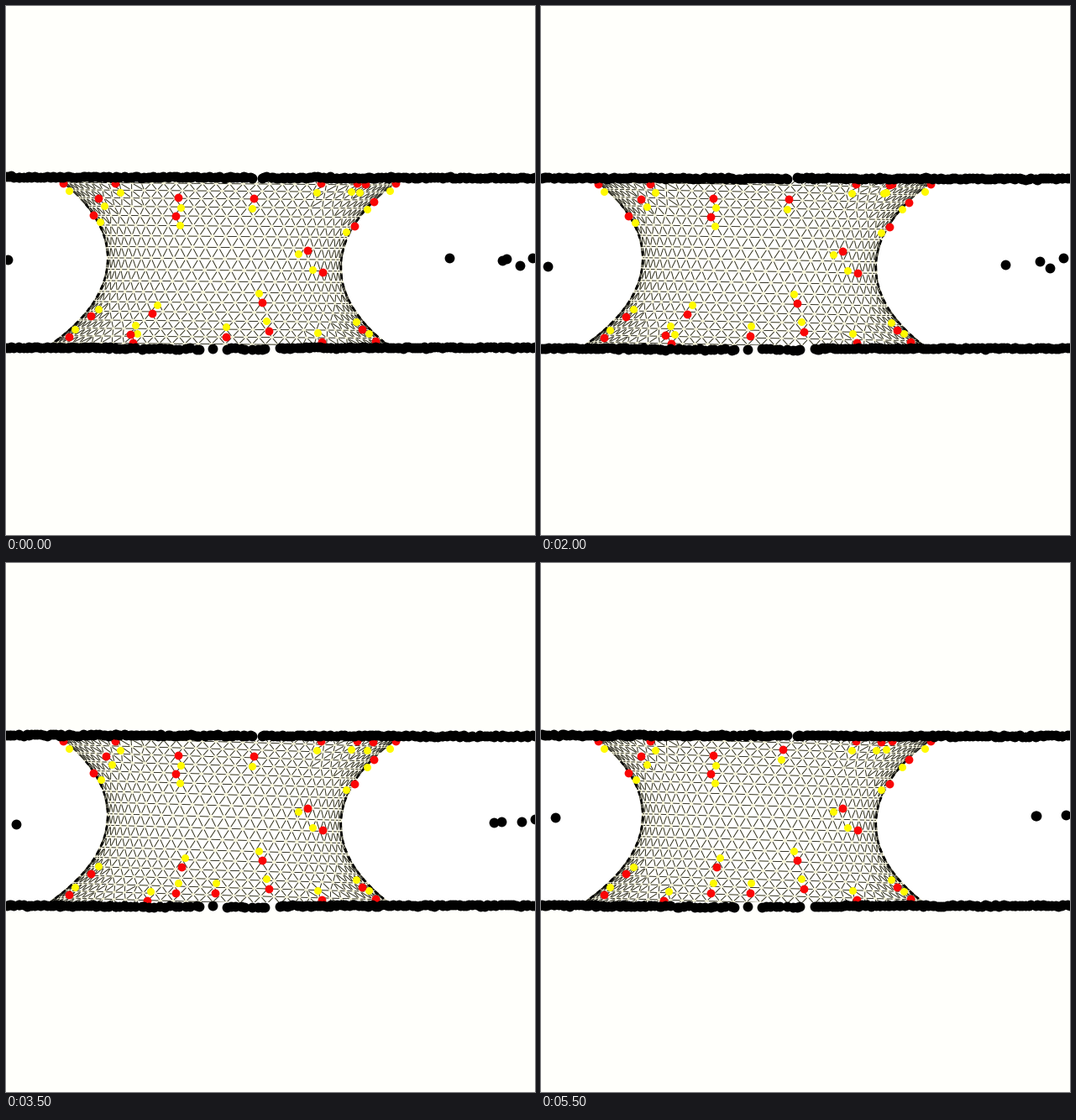
These frames come from a looping animation (630x630 px, 6 s). A matplotlib script:

```python
import numpy as np
import matplotlib.pyplot as plt
from matplotlib.animation import FuncAnimation
from matplotlib.collections import LineCollection
from matplotlib.patches import Rectangle
from matplotlib.tri import Triangulation

SIZE, DPI, FRAMES = 630, 100, 12
PX = 72 / DPI
WAIST_X, WAIST_Y, WAIST_R, FLARE, LEAN = 260, 306, 140, 0.0093, -0.065

# Defects inside the mesh; hops are (frame, start, end)
RESTING = [(205, 228), (202, 250), (359, 291), (377, 317), (313, 387),
           (305, 353), (376, 400), (130, 211), (375, 211), (418, 211)]
HOPS = [(4, (110, 229), (119, 229)), (7, (174, 366), (209, 361)),
        (2, (262, 394), (249, 392)), (8, (295, 229), (288, 221)),
        (5, (148, 391), (202, 392))]
# Heights of the defects along each silhouette
RIM_LEFT, RIM_RIGHT = [211, 249, 369, 394], [211, 233, 262, 385, 399]


def radius(y):
    return WAIST_R * np.cosh(FLARE * (y - WAIST_Y))


def centre(y):
    return WAIST_X + LEAN * (y - WAIST_Y)


def ease(t):
    t = np.clip(t, 0, 1)
    return t * t * (3 - 2 * t)


def drop(frame):
    return 1.6 * (1 - np.exp(-frame / 3))


def build_mesh(spacing=16):
    """Evenly spaced rows on the neck, triangulated in conformal coordinates."""
    y = np.linspace(196, 418, 2000)
    r = radius(y)
    arc = np.concatenate([[0], np.cumsum(np.hypot(np.diff(y), np.diff(r)))])
    conformal = np.concatenate([[0], np.cumsum(np.diff(arc) / r[1:])])
    rows = np.linspace(0, arc[-1], round(arc[-1] / (spacing * 0.866)) + 1)
    theta, v, height = [], [], []
    for j, s in enumerate(rows):
        row_y = np.interp(s, arc, y)
        step = spacing / radius(row_y)
        half = int(2 / step)
        angles = (np.arange(-half, half + 1) + (j % 2) / 2) * step
        theta.extend(angles)
        v.extend([np.interp(s, arc, conformal)] * len(angles))
        height.extend([row_y] * len(angles))
    theta, v, height = map(np.array, (theta, v, height))
    free = abs(theta) < 1.75
    for _ in range(6):
        a, b = Triangulation(theta, v).edges.T
        total, count = np.zeros_like(theta), np.zeros_like(theta)
        for p, q in ((a, b), (b, a)):
            np.add.at(total, p, theta[q])
            np.add.at(count, p, 1)
        theta = np.where(free, (theta + total / count) / 2, theta)
    edges = Triangulation(theta, v).edges
    front = (abs(theta[edges]) < 1.56).all(axis=1)
    return theta, height, edges[front]


def mesh_segments(frame):
    tilt = 0.008 + 0.02 * ease((frame - 2) / 4)
    y = height + drop(frame) + tilt * radius(height) * np.sin(theta)
    x = centre(y) + radius(y) * np.sin(theta)
    x = x + 0.8 * np.cos(theta) * np.sin(height / 23 + frame / 2)
    return np.column_stack([x, y])[edges]


def shorten(segments, trim=0.16):
    a, b = segments[:, :1], segments[:, 1:]
    return np.concatenate([a + trim * (b - a), b - trim * (b - a)], axis=1)


def rim_points(heights, side):
    y = np.array(heights)
    inset = np.where(y > WAIST_Y, 10, 0)
    return np.column_stack([centre(y) + side * (radius(y) - inset), y])


def red_defects(frame):
    hopped = [end if frame >= when else start for when, start, end in HOPS]
    rng = np.random.default_rng(20 + frame // 2)
    passing = np.column_stack([rng.uniform([140, 405], [180, 455]), [401, 212]])
    points = np.vstack([RESTING, hopped, passing,
                        rim_points(RIM_LEFT, -1), rim_points(RIM_RIGHT, 1)])
    return points + [0, drop(frame) * 0.7]


def yellow_partners(reds, gap=12):
    """Each partner sits one lattice step towards the waist."""
    aim = ([WAIST_X, WAIST_Y] - reds) * [0.4, 1]
    return reds + gap * aim / np.linalg.norm(aim, axis=1, keepdims=True)


def drifting(frame):
    turn = 2 * np.pi * frame / FRAMES
    left = [2 + 1.4 * frame, 307 - 5 * np.cos(turn)]
    lead = [528 + 61 * ease(frame / 9), 305 - 5 * np.cos(turn)]
    second = [591 + 3 * np.sin(turn), 306 - 5 * np.cos(2 * turn + 1)]
    leaving = [[x + 2.6 * frame, 306 + 6 * np.sin(turn + x)]
               for x in (596, 612, 627)]
    return [left, lead, second] + leaving


def plate_beads(frame):
    rng = np.random.default_rng(7)
    x = np.arange(-4, 636, 3.5)
    x = x + rng.uniform(-1.5, 1.5, len(x))
    loose = np.arange(154, 330, 6)
    loose = loose + rng.uniform(-2, 2, len(loose))
    top = np.append(x[abs(x - 298.8) > 6], [293, 304.6])
    low = np.concatenate([x[(x < 150) | (x > 328)], loose])
    low = low[(abs(low - 246) > 12) & (abs(low - 318) > 6)]
    low = np.append(low, 246)
    shake = np.random.default_rng(100 + frame)
    top_y = 203.3 + top * 0.002 + drop(frame) + shake.uniform(-1, 1, len(top))
    sag = 1.6 * np.exp(-((low - 235) / 110) ** 4)
    low_y = 406.6 + sag + drop(frame) * 0.8 + shake.uniform(-1, 1, len(low))
    return np.column_stack([np.append(top, low), np.append(top_y, low_y)])


fig = plt.figure(figsize=(SIZE / DPI, SIZE / DPI), dpi=DPI, facecolor="#fffffb")
ax = fig.add_axes([0, 0, 1, 1])
ax.set(xlim=(0, SIZE), ylim=(SIZE, 0))
ax.axis("off")
ax.add_patch(Rectangle((0, 204), SIZE, 203, color="white", lw=0))
window = Rectangle((0, 209), SIZE, 195, transform=ax.transData)


def dots(r, color, z):
    return ax.scatter([], [], s=(2 * r * PX) ** 2, c=color, linewidths=0, zorder=z)


def lines(width, color, z):
    group = LineCollection([], linewidths=width * PX, colors=color, zorder=z,
                           capstyle="butt")
    ax.add_collection(group)
    group.set_clip_path(window)
    return group


theta, height, edges = build_mesh()
halo = lines(1.5, "#f6f4d8", 2)
wires = lines(0.85, "#1a1a16", 3)
yellow = dots(4.5, "#fffa00", 4)
red = dots(4.9, "#fa0606", 5)
beads = dots(5.9, "black", 6)

rim_y = np.linspace(236, 400, 100)
for side in (-1, 1):
    rim, = ax.plot(centre(rim_y) + side * (radius(rim_y) - 1), rim_y, color="black",
                   lw=2.6 * PX, dashes=(2.2, 1.8), dash_capstyle="butt", zorder=3)
    rim.set_clip_path(window)


def update(frame):
    segments = mesh_segments(frame)
    halo.set_segments(segments)
    wires.set_segments(shorten(segments))
    reds = red_defects(frame)
    red.set_offsets(reds)
    yellow.set_offsets(yellow_partners(reds))
    beads.set_offsets(np.vstack([plate_beads(frame), drifting(frame)]))
    return halo, wires, yellow, red, beads


anim = FuncAnimation(fig, update, frames=FRAMES, interval=500, repeat=True,
                     repeat_delay=0)
plt.show()
```
